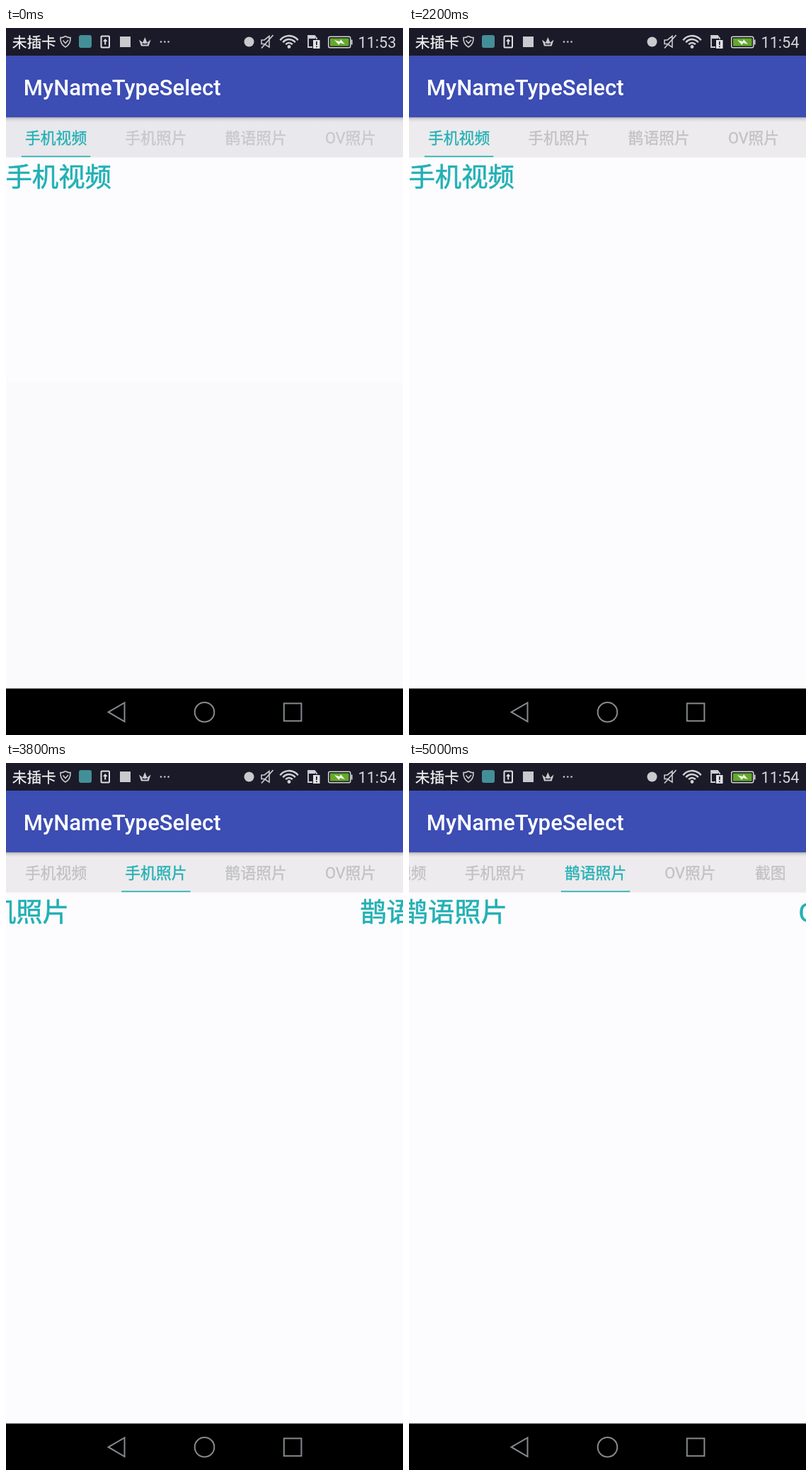
Write an HTML page with a canvas that moves like this. It is 561 by 998 pixels and loops after 5100 ms.

```html
<!DOCTYPE html>
<html lang="zh-CN">
<head>
<meta charset="utf-8">
<title>Tab pager</title>
<style>
html, body { margin: 0; width: 100%; height: 100%; overflow: hidden; background: #000; }
canvas { display: block; width: 561px; height: 998px; }
</style>
</head>
<body>
<canvas id="stage" width="561" height="998"></canvas>
<script>
const ctx = document.getElementById('stage').getContext('2d');
const W = 561, LOOP = 5100, STEP = 100;
const FAMILY = 'Roboto, "Noto Sans CJK SC", "Noto Sans CJK", sans-serif';
const TEAL = '#22b0b5', ICON = '#c9c9ce';
const TAB_HALF = 43.6, LINE_WIDTH = 97.5, MAX_SCROLL = 89.6;
const tabs = [
  { label: '手机视频', x: 27 },
  { label: '手机照片', x: 168.3 },
  { label: '鹊语照片', x: 309.6 },
  { label: 'OV照片', x: 450.9 },
  { label: '截图', x: 578.5 }
];

function rect(x, y, w, h, color) {
  ctx.fillStyle = color;
  ctx.fillRect(x, y, w, h);
}

function text(str, x, y, size, color, { weight = 400, align = 'left', outline = 0 } = {}) {
  ctx.font = `${weight} ${size}px ${FAMILY}`;
  ctx.textAlign = align;
  ctx.fillStyle = ctx.strokeStyle = color;
  ctx.fillText(str, x, y);
  if (outline) {
    ctx.lineWidth = outline;
    ctx.strokeText(str, x, y);
  }
}

function poly(points, closed = false) {
  ctx.beginPath();
  points.forEach(([x, y]) => ctx.lineTo(x, y));
  if (closed) ctx.closePath();
}

function line(points, color, width, closed) {
  poly(points, closed);
  ctx.strokeStyle = color;
  ctx.lineWidth = width;
  ctx.stroke();
}

function shape(points, color) {
  poly(points, true);
  ctx.fillStyle = color;
  ctx.fill();
}

function disc(x, y, r, color) {
  ctx.beginPath();
  ctx.arc(x, y, r, 0, Math.PI * 2);
  ctx.fillStyle = color;
  ctx.fill();
}

function roundBox(x, y, w, h, r) {
  ctx.beginPath();
  ctx.roundRect(x, y, w, h, r);
}

function settle(t, end, distance) {
  return distance * Math.max(0, (end - t) / 450) ** 5;
}

// Distance the pager has moved: drags, then decelerating flings.
function pageOffset(t) {
  if (t < 2400) return 0;
  if (t < 3800) return W - settle(t, 2950, 154);
  if (t < 3900) return W + 60;
  if (t < 5000) return 2 * W - settle(t, 4450, 78);
  return 2 * W + 10;
}

function tabScroll(t) {
  const u = Math.min(1, Math.max(0, (t - 3850) / 200));
  return MAX_SCROLL * (1 - (1 - u) ** 4);
}

function drawNotifications() {
  text('未插卡', 8.7, 28, 20.7, '#f2f2f4', { outline: 0.3 });

  ctx.beginPath();
  ctx.moveTo(84, 11.5);
  ctx.quadraticCurveTo(88, 14, 91, 13.5);
  ctx.quadraticCurveTo(91.5, 23, 84, 27);
  ctx.quadraticCurveTo(76.5, 23, 77, 13.5);
  ctx.quadraticCurveTo(80, 14, 84, 11.5);
  ctx.strokeStyle = ICON;
  ctx.lineWidth = 1.6;
  ctx.stroke();
  line([[80.5, 17.5], [84, 21.5], [88, 17]], ICON, 1.6);

  roundBox(103, 10, 18, 18, 3);
  ctx.fillStyle = '#438f98';
  ctx.fill();

  roundBox(134.5, 11.5, 11.5, 16, 1);
  ctx.strokeStyle = '#dedee2';
  ctx.lineWidth = 2;
  ctx.stroke();
  shape([[140.2, 15], [143.5, 19], [137, 19]], '#dedee2');
  rect(139.2, 18, 2, 5.5, '#dedee2');

  rect(161, 12, 15, 15, ICON);

  shape([[191, 25.5], [188, 16.5], [193.2, 20.5], [196.3, 13], [199.4, 20.5], [204.6, 16.5], [201.6, 25.5]], ICON);
  shape([[193, 23.5], [192, 21.3], [196.3, 22.2], [200.6, 21.3], [199.6, 23.5]], '#1b1a28');

  for (const x of [219, 224.3, 229.6]) disc(x, 19.5, 1.3, ICON);
}

function drawSystemIcons(clock) {
  disc(343.5, 19.5, 7, ICON);

  line([[361, 17], [365, 17], [372, 11.5], [372, 27], [365, 22.5], [361, 22.5]], ICON, 1.6, true);
  line([[377.5, 10], [361, 28.5]], ICON, 1.8);

  ctx.strokeStyle = '#d0d0d5';
  ctx.lineWidth = 2.5;
  for (const r of [6, 11, 16]) {
    ctx.beginPath();
    ctx.arc(400, 27, r, -Math.PI * 0.79, -Math.PI * 0.21);
    ctx.stroke();
  }
  disc(400, 26.5, 2.4, '#d0d0d5');

  line([[433, 27], [427, 27], [427, 11], [436, 11], [439, 14.5], [439, 16]], '#d0d0d5', 1.8);
  rect(428, 11, 9, 4, '#d0d0d5');
  rect(434, 17, 9.5, 12, '#e3e3e7');
  rect(438, 19, 1.7, 5, '#1c1b28');
  rect(438, 25.5, 1.7, 1.7, '#1c1b28');

  roundBox(455.7, 12.2, 31, 15.5, 2);
  ctx.strokeStyle = '#d2d6d0';
  ctx.lineWidth = 1.5;
  ctx.stroke();
  rect(487.5, 16.5, 2, 7, '#d2d6d0');
  rect(458, 14.5, 26.5, 11, '#64a92c');
  shape([[464, 17], [471.5, 19], [473, 16], [479, 23], [472, 21], [470.5, 24]], '#f0f5e9');

  text(clock, 551.5, 28, 21.7, '#d5d5da', { align: 'right' });
}

function drawNavigation() {
  const color = '#858a8e';
  rect(0, 932.4, W, 66, '#000');
  line([[144.7, 965.7], [167.5, 952.5], [167.5, 979]], color, 2, true);
  ctx.beginPath();
  ctx.arc(280.5, 965.7, 13.8, 0, Math.PI * 2);
  ctx.stroke();
  ctx.strokeRect(392.8, 953.4, 24.6, 24.8);
}

function drawTabs(t, early) {
  const selected = t < 2400 ? 0 : t < 3900 ? 1 : 2;
  const scroll = tabScroll(t);
  rect(0, 126, W, 56.7, early ? '#e9e8ec' : '#edebed');
  tabs.forEach(({ label, x }, i) => {
    const color = i === selected ? TEAL : early ? '#c8c7cb' : '#c2c1c4';
    text(label, x - scroll, 162.5, 21.8, color, { outline: 0.35 });
  });
  rect(tabs[selected].x + TAB_HALF - LINE_WIDTH / 2 - scroll, 180.5, LINE_WIDTH, 1.7, TEAL);

  const shadow = ctx.createLinearGradient(0, 126, 0, 133);
  shadow.addColorStop(0, 'rgba(40,40,50,.32)');
  shadow.addColorStop(0.4, 'rgba(40,40,50,.1)');
  shadow.addColorStop(1, 'rgba(40,40,50,0)');
  rect(0, 126, W, 7, shadow);
}

function draw(t) {
  const early = t < 2200;
  rect(0, 0, W, 998, early ? '#fcfcfe' : '#fcfbfd');
  if (early) rect(0, 500, W, 433, '#faf9fc');

  const offset = Math.round(pageOffset(t));
  tabs.forEach(({ label }, i) => {
    const x = i * W - offset;
    if (Math.abs(x) < W) text(label, x - 0.6, 224.2, 37.4, TEAL, { outline: 0.6 });
  });

  drawTabs(t, early);
  rect(0, 0, W, 39, '#1b1a28');
  rect(0, 39, W, 87, '#3c4db4');
  text('MyNameTypeSelect', 24.8, 94.5, 31.1, '#fff', { weight: 500 });
  drawNotifications();
  drawSystemIcons(t < 1200 ? '11:53' : '11:54');
  drawNavigation();
}

const start = performance.now();
function tick() {
  const t = (performance.now() - start) % LOOP;
  draw(Math.floor(t / STEP) * STEP);
  requestAnimationFrame(tick);
}
tick();
</script>
</body>
</html>
```
